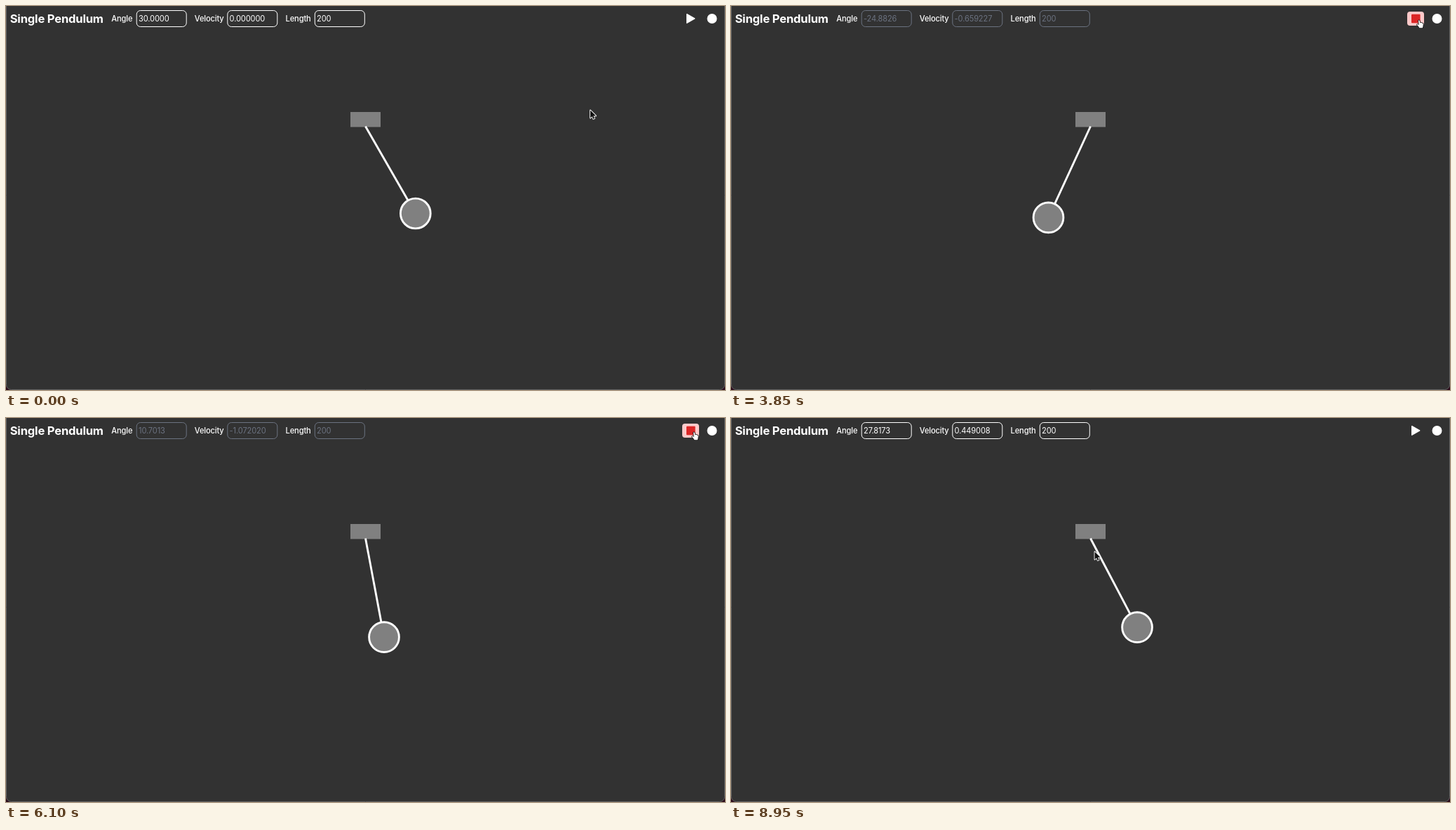
Recreate the animation shown at these times as an HTML page with a canvas. Size 1025x547 px, loop 9.25 s.

```html
<!DOCTYPE html>
<html lang="en">
<head>
<meta charset="utf-8">
<title>Single Pendulum</title>
<style>
  html, body { margin: 0; width: 100%; height: 100%; overflow: hidden; background: #323232; }
  canvas { display: block; }
</style>
</head>
<body>
<canvas id="stage" width="1025" height="547"></canvas>
<script>
const ctx = document.getElementById('stage').getContext('2d');
const LOOP = 9250, TICK = 50;
const START = 2500, STOP = 8250;
const SCALE = 0.713;
const FONT = 'Inter, "Liberation Sans", sans-serif';
const PIVOT = { x: 512.5, y: 172 };

// Semi-implicit Euler at 60 Hz with g / length = 10 / 2
const states = [{ angle: Math.PI / 6, velocity: 0 }];
for (let i = 0; i < 332; i++) {
  const { angle, velocity } = states[i];
  const next = velocity - 5 * Math.sin(angle) / 60;
  states.push({ angle: angle + next / 60, velocity: next });
}

const clamp = v => Math.max(0, Math.min(1, v));
const mix = (a, b, p) => a + (b - a) * p;
const easeOut = p => 1 - (1 - p) ** 2;

function stateAt(t) {
  if (t < START) return states[0];
  if (t < 2800) return states[1];
  return states[Math.min(332, Math.round(69 + 0.0602 * (t - 3850)))];
}

function cursorAt(t) {
  if (t < 50) return [833, 148.5];
  if (t < 350) return [828.5, 134.5];
  if (t < 550) return [826.5, 127.5];
  if (t < 600) return [885, 98];
  if (t < 750) return [960, 68.5];
  if (t < 8300) {
    const p = easeOut(clamp((t - 700) / 450));
    return [mix(960, 980, p), mix(68.5, 20, p)];
  }
  if (t < 8550) return [980, 20 + 2 * clamp((t - 8250) / 200)];
  if (t < 8700) return [954.5, 27.5];
  const p = easeOut(clamp((t - 8650) / 300));
  return [mix(954.5, 518.5, p), mix(27.5, 190.5, p)];
}

function text(str, x, y, size, weight, color) {
  ctx.font = `${weight} ${size}px ${FONT}`;
  ctx.letterSpacing = -0.012 * size + 'px';
  ctx.fillStyle = color;
  ctx.fillText(str, x, y);
}

function roundRect(x, y, w, h, r) {
  ctx.beginPath();
  ctx.roundRect(x, y, w, h, r);
}

function shape(path, x, y, fill, stroke, width) {
  ctx.save();
  ctx.translate(x, y);
  ctx.lineJoin = 'round';
  ctx.lineWidth = width;
  ctx.fillStyle = fill;
  ctx.strokeStyle = stroke;
  ctx.stroke(path);
  ctx.fill(path);
  ctx.restore();
}

const playIcon = new Path2D('M1 1 L12 7.3 L1 13.6 Z');
const arrow = new Path2D('M0 0 V11 L2.6 8.7 L4.2 12.4 L6 11.6 L4.4 8 H8 Z');
const hand = new Path2D('M0 .8 Q.9 -.2 1.6 .8 L2.4 4 Q3.2 3.4 3.9 4.1 Q4.8 3.6 5.4 4.5 ' +
  'Q6.6 4.2 6.7 5.6 Q7 8.4 5.9 11.2 H1.4 Q.3 9 -2 7 Q-2 5.7 -.8 6 L.8 7.1 Z');

function drawWindow() {
  ctx.fillStyle = '#2b0b1a';
  ctx.fillRect(0, 0, 1025, 547);
  roundRect(0.5, -20, 1024, 566.5, 7);
  ctx.fillStyle = '#323232';
  ctx.fill();
  ctx.strokeStyle = '#626262';
  ctx.lineWidth = 1;
  ctx.stroke();
}

function drawField(label, labelX, value, x, enabled) {
  text(label, labelX, 22, 11.1, 500, '#fff');
  roundRect(x + 0.5, 6.5, 71, 23, 5.5);
  ctx.lineWidth = 1;
  ctx.strokeStyle = enabled ? '#fff' : '#6b7280';
  ctx.stroke();
  text(value, x + 3.3, 22, 11.1, 400, enabled ? '#fff' : '#6b7280');
}

function drawButton(t, running) {
  const hover = clamp((t - 900) / 150) * (1 - clamp((t - 8650) / 150));
  ctx.globalAlpha = hover;
  roundRect(964, 8, 24, 20, 4);
  ctx.fillStyle = running ? '#fecaca' : '#a7f3d0';
  ctx.fill();
  ctx.globalAlpha = 1;
  if (running) {
    roundRect(970, 11.7, 12.6, 12.6, 1);
    ctx.fillStyle = '#dc2626';
    ctx.fill();
  } else {
    shape(playIcon, 969.7, 10.6, '#fff', '#fff', 1.4);
    ctx.globalAlpha = hover;
    shape(playIcon, 969.7, 10.6, '#059669', '#059669', 1.4);
    ctx.globalAlpha = 1;
  }
}

function drawPendulum(angle) {
  const x = PIVOT.x + 200 * SCALE * Math.sin(angle);
  const y = PIVOT.y + 200 * SCALE * Math.cos(angle);
  ctx.fillStyle = '#808080';
  ctx.fillRect(491, 151, 43, 21.4);
  ctx.strokeStyle = '#fff';
  ctx.lineWidth = 4 * SCALE;
  ctx.beginPath();
  ctx.moveTo(PIVOT.x, PIVOT.y - 0.5);
  ctx.lineTo(x, y);
  ctx.stroke();
  ctx.beginPath();
  ctx.arc(x, y, 30 * SCALE, 0, 2 * Math.PI);
  ctx.fill();
  ctx.stroke();
}

function drawCursor(t) {
  const [x, y] = cursorAt(t);
  const overButton = x > 964 && x < 988 && y < 28;
  if (overButton) shape(hand, x, y, '#fff', '#111', 1.5);
  else shape(arrow, x, y, '#111', '#fff', 1.8);
}

function draw(now) {
  const t = Math.floor((now % LOOP) / TICK) * TICK;
  const running = t >= START && t < STOP;
  const { angle, velocity } = stateAt(t);

  drawWindow();
  text('Single Pendulum', 5.7, 24, 16.6, 700, '#fff');
  drawField('Angle', 150.3, (angle * 180 / Math.PI).toFixed(4), 185.7, !running);
  drawField('Velocity', 268.8, velocity.toFixed(6), 315.3, !running);
  drawField('Length', 398.6, '200', 439.8, !running);
  drawButton(t, running);
  ctx.beginPath();
  ctx.arc(1006.5, 18, 7, 0, 2 * Math.PI);
  ctx.fillStyle = '#fff';
  ctx.fill();
  drawPendulum(angle);
  drawCursor(t);
}

const began = performance.now();
function tick() {
  draw(performance.now() - began);
  requestAnimationFrame(tick);
}
tick();
</script>
</body>
</html>
```
